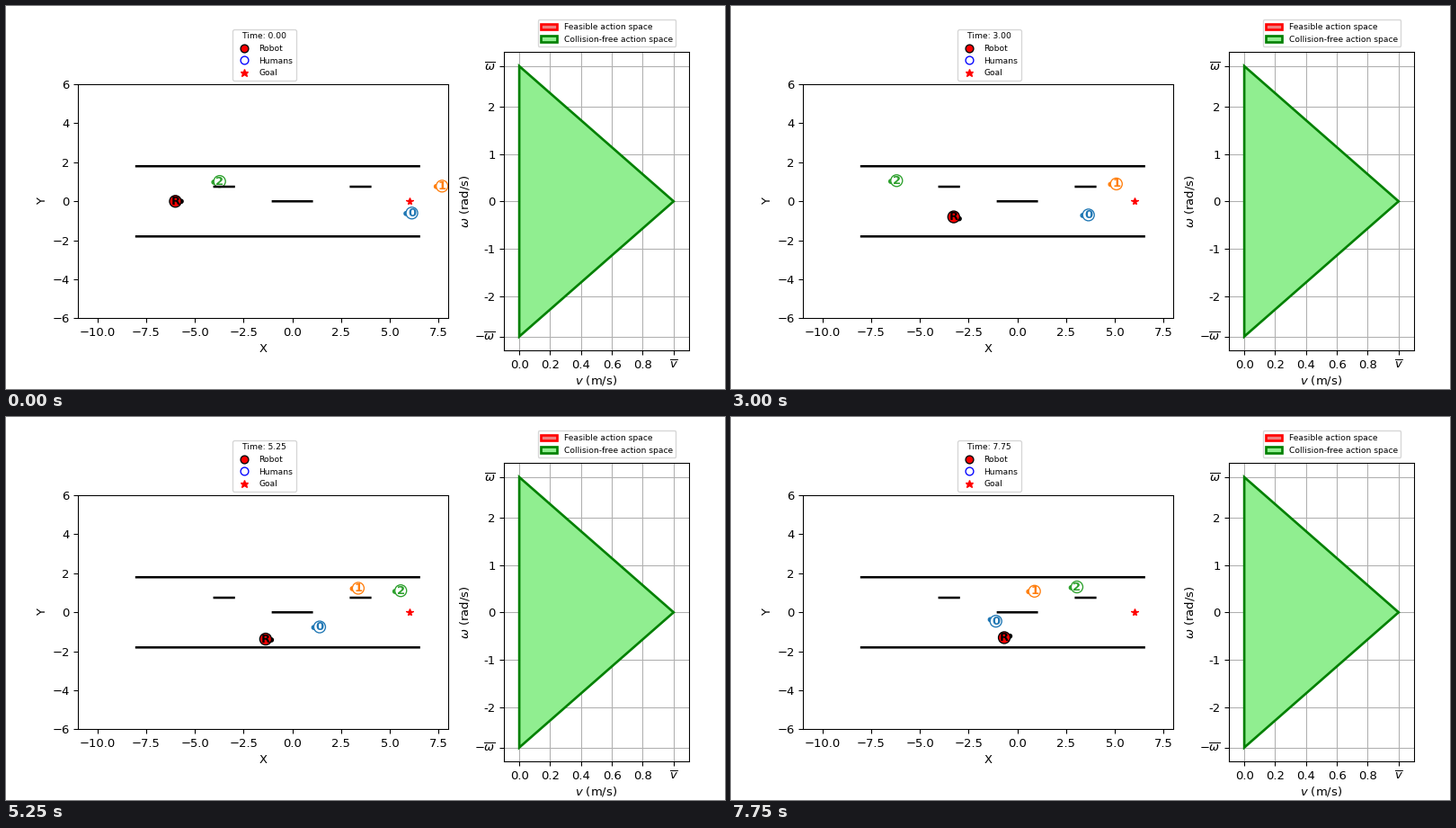
A matplotlib script that plays this animation: 800x426 px, repeating every 8000 ms.

```python
import numpy as np
import matplotlib.pyplot as plt
from matplotlib.animation import FuncAnimation
from matplotlib.lines import Line2D
from matplotlib.patches import Circle, Patch, Polygon

W, H, DPI = 800, 426, 96
STEP, FRAMES = 0.25, 32
W_MAX = 2 / 0.7  # top turning speed
RADIUS = 0.3

plt.rcParams.update({
    "font.family": "DejaVu Sans",
    "font.size": 9.8,
    "legend.fontsize": 6.84,
    "legend.title_fontsize": 6.84,
})


def ramps(t, start, *steps):
    """Start value plus eased changes, each given as (amount, begin, end)."""
    for amount, begin, end in steps:
        u = np.clip((t - begin) / (end - begin), 0, 1)
        start += amount * u * u * (3 - 2 * u)
    return start


def pull_away(t, lag):
    """Distance covered at unit speed after starting from rest."""
    return t - lag * (1 - np.exp(-t / lag))


# Each path gives x, y and heading in degrees.
def robot_path(t):
    drive = min(t, 4.9)
    creep, leave = np.clip(t - 4.9, 0, 1.85), max(t - 6.75, 0)
    x = -6 + 0.96 * pull_away(drive, 0.15) + 0.2 * creep + 0.4 * leave
    y = ramps(t, -0.29 * pull_away(drive, 0.25), (-0.1, 4.9, 6), (0.22, 6.5, 8.5))
    turn = ramps(t, 0, (-18, 0, 0.75), (10, 4, 5.2), (-6, 5.25, 6.25), (29, 6.25, 7.75))
    return x, y, turn


def lower_path(t):
    y = ramps(t, -0.6, (-0.15, 0, 5), (0.35, 5.5, 8.5))
    return 6.13 - pull_away(t, 0.52), y, ramps(t, 185, (-22, 6.25, 8))


def sidestep_path(t):
    x = ramps(t, 7.68 - pull_away(t, 0.4), (0.55, 3.8, 5.2))
    y = ramps(t, 0.78 + 0.037 * t, (0.26, 3.75, 5), (-0.26, 6.25, 8))
    return x, y, 184


def wrapping_path(t):
    x = -3.73 - pull_away(t, 0.54)
    y = ramps(t, 1.02, (0.31, 0, 1), (-0.27, 1, 3), (0.26, 4, 8.5))
    turn = ramps(t, 187, (15, 0.3, 1), (-15, 1, 2.25))
    return x + (14 if x < -7 else 0), y, turn


class Agent:
    def __init__(self, ax, path, label, edge, face):
        self.path = path
        self.head = ax.add_patch(Circle((0, 0), 0.1, color=edge, zorder=1))
        self.body = ax.add_patch(Circle((0, 0), RADIUS, ec=edge, fc=face, zorder=1))
        self.text = ax.text(0, 0, label, color=edge, weight="bold",
                            ha="center", va="center", zorder=3, clip_on=True)

    def move(self, t):
        x, y, turn = self.path(t)
        a = np.radians(turn)
        self.head.center = x + RADIUS * np.cos(a), y + RADIUS * np.sin(a)
        self.body.center = x, y
        self.text.set_position((x, y))


def triangle(v, up, down):
    return [(0, up * W_MAX), (v, 0), (0, -down * W_MAX)]


def place_legend(ax, handles, x, bottom, **kw):
    return ax.legend(handles=handles, loc="lower center", borderaxespad=0,
                     bbox_to_anchor=(x / W, 1 - bottom / H),
                     bbox_transform=ax.figure.transFigure, **kw)


def key(marker, face, edge, label):
    return Line2D([], [], ls="none", marker=marker, ms=6.6, mfc=face, mec=edge,
                  label=label)


fig, (world, actions) = plt.subplots(
    1, 2, figsize=(W / DPI, H / DPI), dpi=DPI,
    gridspec_kw=dict(width_ratios=[2, 1], wspace=0.2,
                     left=0.1, right=0.95, bottom=0.1, top=0.88))

# World view
world.set(xlim=(-11, 8), ylim=(-6, 6), aspect="equal")
world.set_xlabel("X")
world.set_ylabel("Y", labelpad=3)
for x0, x1, y in [(-8, 6.5, 1.8), (-8, 6.5, -1.8), (-4, -3, .75), (3, 4, .75), (-1, 1, 0)]:
    world.plot([x0, x1], [y, y], color="black", lw=1.9, snap=False)
world.plot(6, 0, "*", color="red", ms=6, snap=False)
agents = [Agent(world, path, str(i), f"C{i}", "white")
          for i, path in enumerate([lower_path, sidestep_path, wrapping_path])]
agents.append(Agent(world, robot_path, "R", "black", "red"))
clock = place_legend(world, [key("o", "red", "black", "Robot"),
                             key("o", "white", "blue", "Humans"),
                             key("*", "red", "red", "Goal")],
                     287.5, 82.8, title="Time: 0.00").get_title()

# Action space
actions.set(xlim=(-0.1, 1.1), ylim=(-W_MAX - 0.3, W_MAX + 0.3))
actions.set_xlabel(r"$v$ (m/s)", labelpad=2)
actions.set_ylabel(r"$\omega$ (rad/s)", labelpad=2)
actions.set_xticks([0, .2, .4, .6, .8, 1],
                   ["0.0", "0.2", "0.4", "0.6", "0.8", r"$\overline{v}$"])
actions.set_yticks([-W_MAX, -2, -1, 0, 1, 2, W_MAX],
                   [r"$-\overline{\omega}$", "-2", "-1", "0", "1", "2",
                    r"$\overline{\omega}$"])
actions.grid(True)
RED = dict(fc="lightcoral", ec="red", lw=2)
GREEN = dict(fc="lightgreen", ec="green", lw=2)
feasible = actions.add_patch(Polygon(triangle(1, 1, 1), zorder=3, **RED))
free = actions.add_patch(Polygon(triangle(1, 1, 1), zorder=4, **GREEN))
place_legend(actions, [Patch(label="Feasible action space", **RED),
                       Patch(label="Collision-free action space", **GREEN)],
             668.5, 45.2)


def update(n):
    t = n * STEP
    for agent in agents:
        agent.move(t)
    clock.set_text(f"Time: {t:.2f}")
    blocked = t == 5 or 5.5 <= t <= 6.5
    feasible.set_visible(blocked)
    free.set_xy(triangle(0.393, 1, 0) if blocked else triangle(1, 1, 1))
    return []


anim = FuncAnimation(fig, update, frames=FRAMES, interval=1000 * STEP,
                     init_func=lambda: update(0), repeat=True, repeat_delay=0)
plt.show()
```
